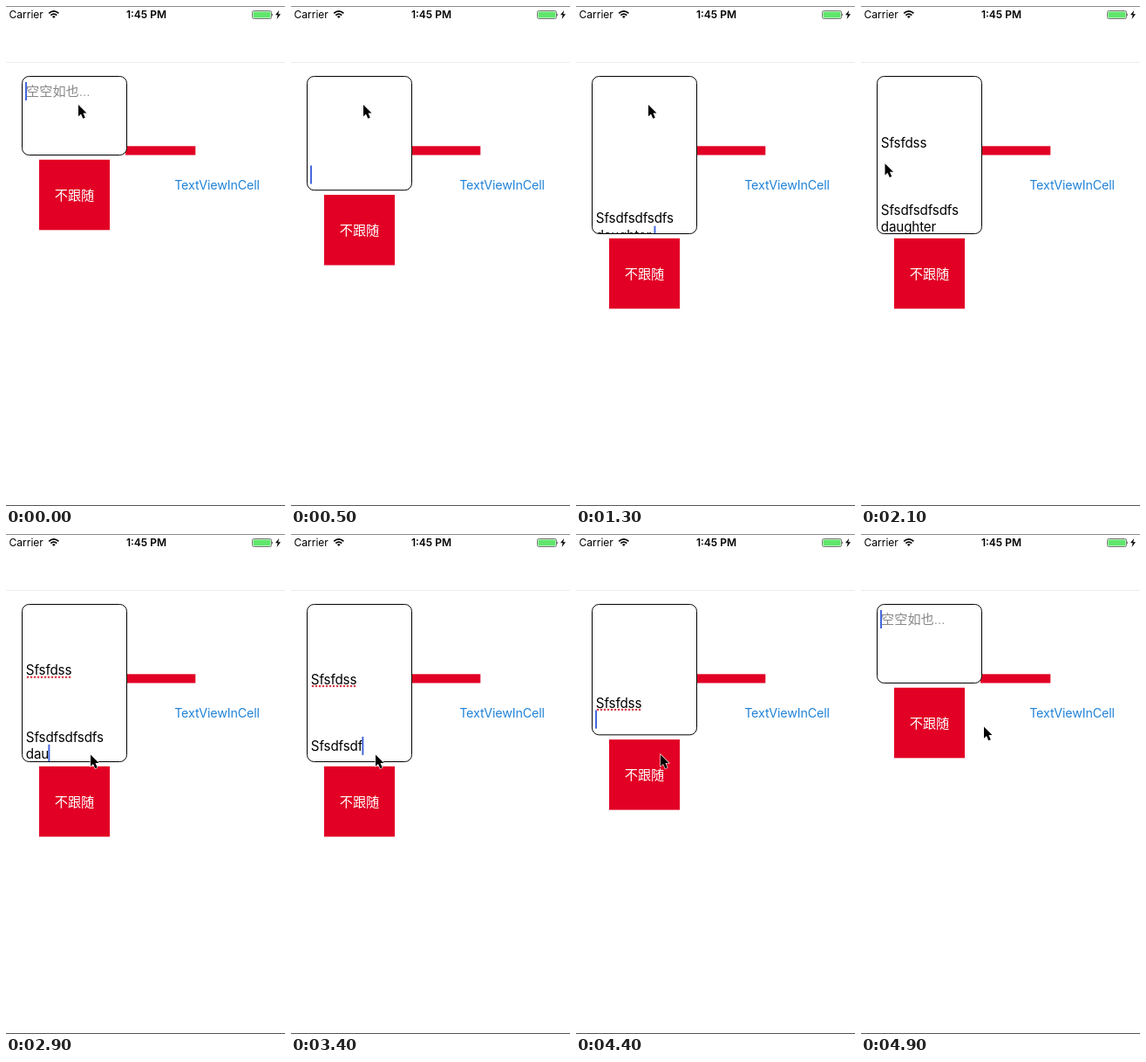
An HTML page for the animation above (5000 ms loop, 320 by 572 pixels).

```html
<!DOCTYPE html>
<html lang="zh-CN">
<head>
<meta charset="utf-8">
<title>Growing text view</title>
<style>
  html, body { margin: 0; width: 100%; height: 100%; overflow: hidden; background: #fff; }
  svg { display: block; width: 100%; height: 100%; }
  text { font-family: Inter, "Noto Sans CJK SC", "Noto Sans CJK", sans-serif; white-space: pre; }
  .status { font-size: 12px; }
  .typed { font-size: 15.2px; letter-spacing: -.15px; }
  .cjk { font-size: 15.2px; font-weight: 300; }
</style>
</head>
<body>
<svg viewBox="0 0 320 572">
  <defs>
    <clipPath id="clip"><rect id="clipBox" x="19" y="81" width="119" rx="7.5"/></clipPath>
  </defs>
  <rect width="320" height="572" fill="#fff"/>
  <path d="M0 .5H320" stroke="#8c8c8c"/>
  <path d="M0 571.5H320" stroke="#555"/>
  <path d="M0 64.5H320" stroke="#ececec"/>

  <text class="status" x="3.6" y="14">Carrier</text>
  <g fill="none" stroke="#000" stroke-width="1.7">
    <path d="M49.2 8.4Q54.8 3.4 60.4 8.4"/>
    <path d="M51.3 10.7Q54.8 7.6 58.3 10.7"/>
  </g>
  <path d="M52.9 12Q54.8 10.4 56.7 12L54.8 14Z"/>
  <text class="status" x="161" y="14" text-anchor="middle" font-weight="600">1:45 PM</text>
  <rect x="282.5" y="5.5" width="22" height="9" rx="1.8" fill="#fff" stroke="#777"/>
  <rect x="283.5" y="6.5" width="20" height="7" rx=".8" fill="#60e66c"/>
  <path d="M305.3 8.2Q307 10 305.3 11.8Z" fill="#333"/>
  <path d="M313.2 5L309 10.3H311.7L310.6 15L315 9.3H312.2Z"/>

  <rect x="137" y="160.3" width="80.3" height="10.2" fill="#e20025"/>
  <text x="242" y="210" text-anchor="middle" font-size="14.3" letter-spacing="-.15" fill="#2083d8">TextViewInCell</text>

  <g id="follower">
    <rect x="38" width="81" height="80.5" fill="#e20025"/>
    <text class="cjk" x="78.5" y="46" text-anchor="middle" fill="#fff">不跟随</text>
  </g>

  <rect id="box" x="18.5" y="80.5" width="120" rx="8" fill="#fff" stroke="#000"/>
  <g clip-path="url(#clip)">
    <text id="hint" class="cjk" x="23" y="103" fill="#888">空空如也...</text>
    <g id="content">
      <text class="typed" id="six" x="22.8"></text>
      <text class="typed" id="ten" x="22.8"></text>
      <text class="typed" id="eleven" x="22.8"></text>
      <path id="squiggle" stroke="#dc3c48" stroke-width="2.6" stroke-linecap="round" stroke-dasharray="0 4"/>
      <rect id="caret" width="2" height="21" fill="#4468dc"/>
    </g>
  </g>
  <path id="pointer" d="M0 0V13.2L3 10.4L5.3 15.8L7.8 14.7L5.5 9.5H9.5Z" stroke="#fff" stroke-width="1.2" paint-order="stroke"/>
</svg>
<script>
const $ = id => document.getElementById(id);
const LOOP = 5000, TICK = 100, PITCH = 19.1;
const lineY = n => 97.5 + PITCH * (n - 1);
const atRow = (n, more) => ({ rows: n, caret: n, ...more });
const word = 'Sfsdfsdfsdfs';

// Edits by tick; each one adds to the state before it
const edits = {
  0: atRow(1, { scroll: 0, six: '', ten: '', eleven: '', misspelt: false }),
  1: atRow(2), 2: atRow(3), 3: atRow(4), 4: atRow(5), 5: atRow(6), 6: atRow(8), 7: atRow(9),
  8: atRow(10, { scroll: 26.4 }),
  11: { ten: word.slice(0, 5) },
  12: { ten: word },
  13: atRow(11, { eleven: 'daughter ' }),
  14: { scroll: 36.3, caret: 10 },
  15: { caret: 8 }, 16: { caret: 7 }, 17: { caret: 6 },
  18: { six: 'Sfsf' },
  19: { six: 'Sfsfdss' },
  21: { caret: 0 },
  26: { caret: 11, scroll: 37.2, misspelt: true },
  27: { eleven: 'daughte' }, 28: { eleven: 'daugh' }, 29: { eleven: 'dau' }, 30: { eleven: 'd' },
  31: atRow(10, { eleven: '', scroll: 27 }),
  39: atRow(9, { ten: '', scroll: 7 }),
  40: { scroll: 3 },
  41: atRow(8, { scroll: 0 }),
  43: atRow(7),
  45: atRow(6, { six: 'Sfsf' }),
  46: atRow(5, { six: '' }),
  47: atRow(4), 48: atRow(2), 49: atRow(1)
};
[11, 10, 8, 6, 4, 2, 1].forEach((n, i) => edits[32 + i] = { ten: word.slice(0, n) });

// Pointer stops: tick, x, y
const stops = [[21, 27.5, 180.3], [22, 27.5, 180.3], [25, 97, 252.5], [44, 97, 252.5], [48, 141, 220.5]];

function pointerAt(tick) {
  if (tick < stops[0][0]) return [83, 113];
  const i = stops.findIndex(s => s[0] > tick);
  if (i < 0) return stops[stops.length - 1].slice(1);
  const [t0, x0, y0] = stops[i - 1], [t1, x1, y1] = stops[i];
  const p = (tick - t0) / (t1 - t0), e = p * p * (3 - 2 * p);
  return [x0 + (x1 - x0) * e, y0 + (y1 - y0) * e];
}

function set(el, attrs) {
  for (const k in attrs) el.setAttribute(k, attrs[k]);
}

const lines = { 6: $('six'), 10: $('ten'), 11: $('eleven') };
for (const n in lines) set(lines[n], { y: lineY(n) + 5.5 });
const show = (el, on) => set(el, { visibility: on ? 'visible' : 'hidden' });
const textWidth = el => el && el.textContent ? el.getComputedTextLength() : 0;

function draw(tick) {
  const s = {};
  for (let k = 0; k <= tick; k++) Object.assign(s, edits[k]);

  const h = Math.min(180, Math.max(90, 15.6 + PITCH * s.rows));
  set($('box'), { height: h });
  set($('clipBox'), { height: h - 1 });
  set($('follower'), { transform: `translate(0 ${85.8 + h})` });
  set($('content'), { transform: `translate(0 ${-s.scroll})` });

  lines[6].textContent = s.six;
  lines[10].textContent = s.ten;
  lines[11].textContent = s.eleven;
  show($('hint'), s.rows === 1);

  show($('squiggle'), s.misspelt && s.six);
  set($('squiggle'), { d: `M25 ${lineY(6) + 8}H${22.5 + textWidth(lines[6])}` });
  show($('caret'), s.caret);
  set($('caret'), { x: 22 + textWidth(lines[s.caret]), y: lineY(s.caret) - 10.5 });

  set($('pointer'), { transform: `translate(${pointerAt(tick)})` });
}

const start = performance.now();
function loop() {
  draw(Math.floor((performance.now() - start) % LOOP / TICK));
  requestAnimationFrame(loop);
}
loop();
</script>
</body>
</html>
```
